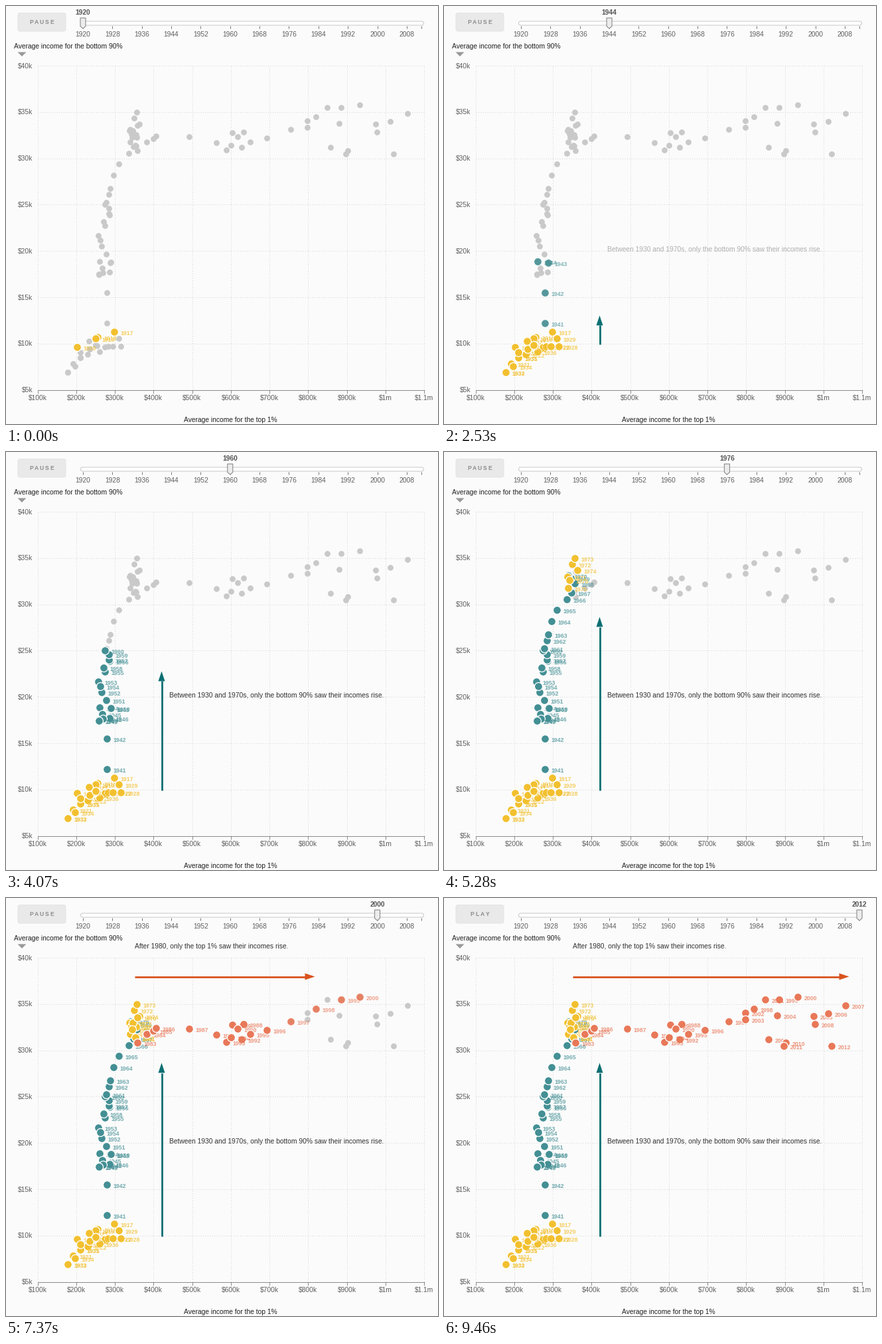
A matplotlib script that plays this animation: 651 by 630 pixels, repeating every 9.57 s.

```python
import numpy as np
import matplotlib.pyplot as plt
from matplotlib.animation import FuncAnimation
from matplotlib.patches import Circle, FancyBboxPatch, Polygon

W, H, DPI = 651, 630, 64
FRAMES, INTERVAL = 87, 110
PT = 72 / DPI                      # points per pixel
FIRST_TICK, TICK = 6.15, 3.09      # in frames; each tick adds four years
STEP_YEARS, START, END = 4, 1920, 2012

BG, INK, GREY = "#fbfbfb", "#333333", "#606060"
YELLOW, TEAL, ORANGE = "#f2c02f", "#438f94", "#e87858"
TEAL_ARROW, ORANGE_ARROW = "#0c6f73", "#d9531e"

# Dot positions on the stage, one pair per year: (first year, colour, fade, points)
ERAS = [
    (1917, YELLOW, 1.6, [
        (163, 491), (138, 499), (135, 501), (107, 514), (101, 539), (123, 525),
        (125, 505), (135, 511), (149, 514), (154, 513), (161, 513), (173, 513),
        (170, 501), (126, 517), (112, 530), (93, 552), (93, 552), (104, 543),
        (112, 530), (141, 521), (137, 512), (112, 522), (126, 517), (135, 511)]),
    (1941, TEAL, 1.6, [
        (152, 478), (152, 432), (157, 387), (141, 385), (145, 395), (156, 401),
        (140, 404), (146, 402), (140, 405), (158, 386), (151, 374), (144, 362),
        (139, 346), (142, 353), (149, 331), (156, 315), (155, 313), (147, 325),
        (155, 305), (149, 299), (151, 296), (155, 284), (157, 275), (162, 255),
        (170, 238), (185, 222), (192, 212), (197, 198), (191, 190), (187, 186)]),
    (1971, YELLOW, 1.6, [
        (186, 188), (193, 169), (197, 160), (201, 178), (187, 205), (189, 193),
        (196, 194), (191, 188), (198, 180), (190, 198), (196, 211), (195, 210)]),
    (1983, ORANGE, 2.4, [
        (198, 218), (212, 205), (222, 200), (226, 196), (276, 197), (358, 190),
        (341, 191), (349, 197), (317, 206), (355, 213), (332, 217), (339, 210),
        (368, 205), (393, 199), (429, 186), (467, 167), (505, 153), (533, 149),
        (484, 153), (454, 173), (454, 183), (502, 177), (557, 178), (579, 174),
        (605, 162), (559, 190), (489, 213), (515, 218), (512, 223), (584, 223)]),
]

fig = plt.figure(figsize=(W / DPI, H / DPI), dpi=DPI, facecolor=BG)
ax = fig.add_axes([0, 0, 1, 1])
ax.set_xlim(-0.5, W - 0.5)
ax.set_ylim(H - 0.5, -0.5)
ax.axis("off")


def write(x, y, s, size=10.2, color=INK, ha="left", **kw):
    """Text whose digits are centred on y."""
    return ax.text(x, y + 0.36 * size, s, fontsize=size * PT, color=color, ha=ha,
                   va="baseline", family="Liberation Sans", **kw)


def line(x0, y0, x1, y1, color, width=1, **kw):
    return ax.plot([x0, x1], [y0, y1], color=color, lw=width * PT,
                   solid_capstyle="butt", **kw)[0]


def rounded(x, y, w, h, r, fill, edge, z):
    ax.add_patch(FancyBboxPatch((x, y), w, h, boxstyle=f"round,pad=0,rounding_size={r}",
                                fc=fill, ec=edge, lw=PT, zorder=z))


def slider_x(year):
    return 115.5 + (year - START) * 5.544


def tick_frame(year):
    """Time, in frames, at which a year is revealed."""
    if year <= START:
        return -100
    return FIRST_TICK + (np.ceil((year - START) / STEP_YEARS) - 1) * TICK


def draw_axes():
    dots = dict(linestyle=(0, (1, 2.5)), zorder=1)
    for i in range(11):
        x = 47 + 58.25 * i
        label = f"${100 + 100 * i}k" if i < 9 else ("$1m", "$1.1m")[i - 9]
        line(x, 90, x, 578, "#d2d2d2", **dots)
        line(x, 578, x, 583, "#8c8c8c", zorder=1)
        write(x, 590, label, color=GREY, ha="center")
    for i in range(8):
        y = 578 - 69.8 * i
        if i:
            line(47, y, 629.5, y, "#d2d2d2", **dots)
        write(40, y, f"${5 + 5 * i}k", color=GREY, ha="right")
    line(47, 578, 630, 578, "#8c8c8c", zorder=1)
    write(11, 60, "Average income for the bottom 90%", color="#222222")
    write(338, 623, "Average income for the top 1%", color="#222222", ha="center")
    ax.add_patch(Polygon([(17, 69), (30, 69), (23.5, 75.5)], fc="#999999", lw=0))


def draw_slider():
    rounded(112, 22.5, 517, 6, 3, "#ffffff", "#c8c8c8", 2)
    for year in range(START, 2009, 8):
        write(slider_x(year), 42, year, color=GREY, ha="center")
    for year in [*range(START, 2009, 8), END]:
        line(slider_x(year), 29, slider_x(year), 33.5, "#777777", zorder=1)


def button_word(word):
    rank = np.arange(len(word)) - (len(word) - 1) / 2
    return [write(53.5 + 7.8 * r, 23.5, c, 8.6, "#8a8a8a", "center", weight="bold", zorder=3)
            for r, c in zip(rank, word)]


class Arrow:
    """Line with a triangular head, growing up or to the right."""

    def __init__(self, tail, direction, color):
        self.tail, self.dir = np.array(tail, float), np.array(direction, float)
        self.shaft = line(0, 0, 0, 0, color, 2.8, zorder=300)
        self.head = ax.add_patch(Polygon(np.zeros((3, 2)), fc=color, lw=0, zorder=300))

    def grow(self, length):
        for part in (self.shaft, self.head):
            part.set_visible(length > 0)
        tip = self.tail + self.dir * length
        base = tip - self.dir * min(15, max(length, 0))
        side = self.dir[::-1] * 5
        self.shaft.set_data(*np.transpose([self.tail, base]))
        self.head.set_xy([tip, base + side, base - side])


draw_axes()
draw_slider()
rounded(17.5, 10, 72, 27.5, 3, "#e9e9e9", "#e4e4e4", 2)
pause, play = button_word("PAUSE"), button_word("PLAY")

handle = ax.add_patch(Polygon(np.zeros((5, 2)), fc="#ececec", ec="#8a8a8a",
                              lw=1.1 * PT, zorder=4))
handle_label = write(0, 9, "", color="#555555", ha="center", weight="bold")

marks = []
for first, color, fade, points in ERAS:
    for i, (x, y) in enumerate(points):
        year = first + i
        ax.add_patch(Circle((x, y), 4.4, fc="#c9c9c9", lw=0, zorder=5))
        z = 10 + (year - 1917)
        dot = ax.add_patch(Circle((x, y), 6.0, fc=color, ec="white", lw=1.3 * PT, zorder=z))
        tag = write(x + 9, y + 1, year, 8.7, color, weight="bold", zorder=z)
        marks.append((tick_frame(year), fade, dot, tag))

rise = Arrow((234, 509.5), (0, -1), TEAL_ARROW)
spread = Arrow((193, 118), (1, 0), ORANGE_ARROW)
rise_note = write(245, 366, "Between 1930 and 1970s, only the bottom 90% saw their incomes rise.",
                  zorder=300)
spread_note = write(193, 72, "After 1980, only the top 1% saw their incomes rise.", zorder=300)
RISE_AT, SPREAD_AT = tick_frame(1940), tick_frame(1980)


def ramp(age, length):
    return float(np.clip(age / length, 0, 1))


def update(frame):
    ticks = max(0, int(np.floor((frame - FIRST_TICK) / TICK)) + 1)
    year = min(START + STEP_YEARS * ticks, END)
    x = slider_x(year)
    handle.set_xy([(x - 4, 17.5), (x + 4, 17.5), (x + 4, 30), (x, 33.5), (x - 4, 30)])
    handle_label.set_x(x)
    handle_label.set_text(str(year))

    done = START + STEP_YEARS * ticks > END
    for letter in pause:
        letter.set_visible(not done)
    for letter in play:
        letter.set_visible(done)

    for start, fade, dot, tag in marks:
        alpha = ramp(frame - start, fade)
        dot.set_visible(alpha > 0)
        tag.set_visible(alpha > 0)
        dot.set_alpha(alpha)
        tag.set_alpha(0.75 * alpha)

    rise.grow(min(9.71 * (frame - RISE_AT), 261.5))
    spread.grow(np.interp(frame, [SPREAD_AT, 60, 67, 80], [0, 194, 272, 417]))
    rise_note.set_alpha(ramp(frame - RISE_AT, 12))
    spread_note.set_alpha(ramp(frame - SPREAD_AT, 10))
    return []


anim = FuncAnimation(fig, update, frames=FRAMES, interval=INTERVAL,
                     repeat=True, repeat_delay=0, blit=False)
plt.show()
```
